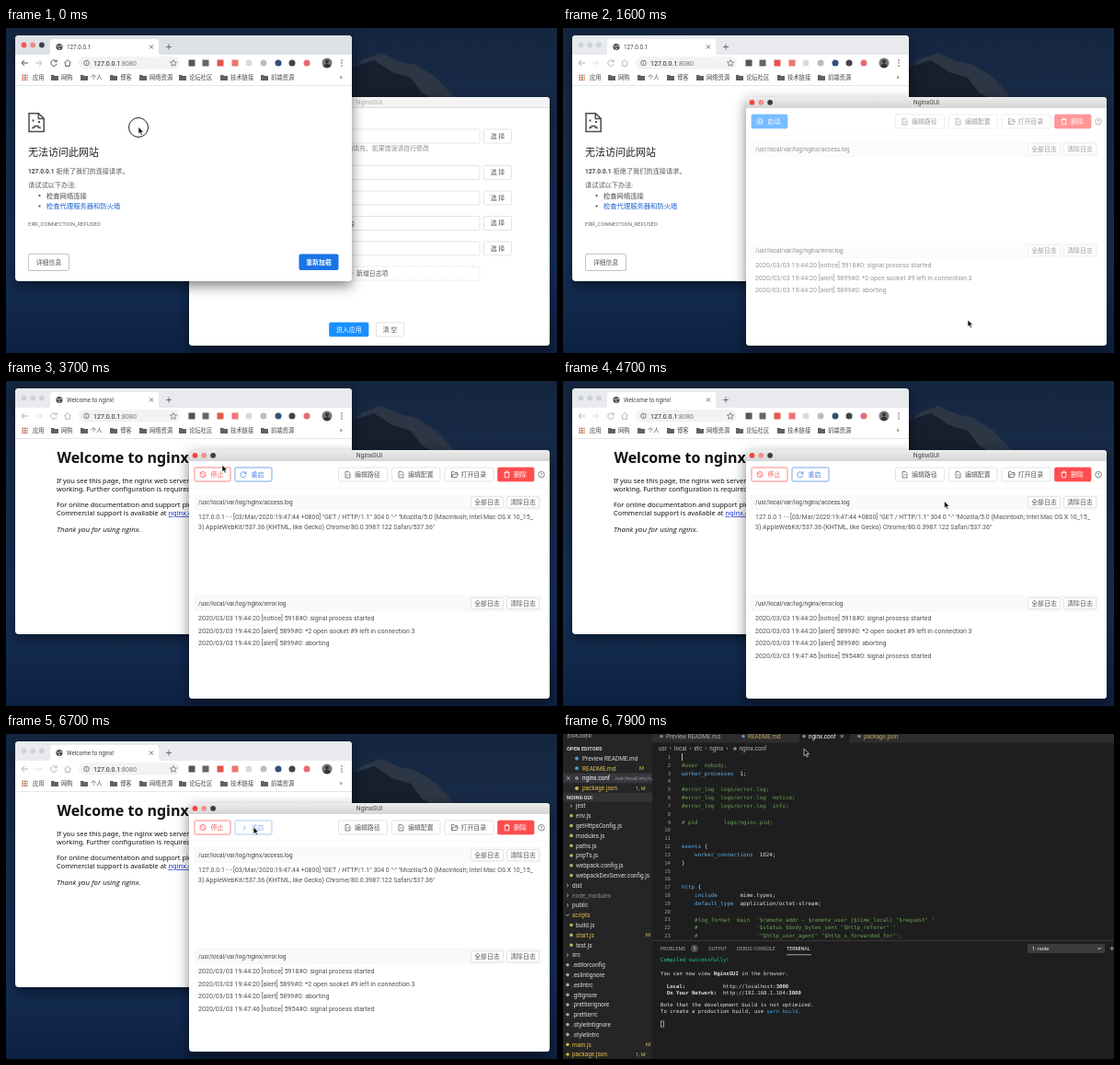
Animation, 599 px wide and 353 px high, one loop 8 s. Source, as an HTML page:

```html
<!DOCTYPE html>
<html lang="zh">
<head>
<meta charset="utf-8">
<title>NginxGUI</title>
<style>
html, body { margin: 0; width: 100%; height: 100%; overflow: hidden; background: #10213c; }
svg { display: block; width: 599px; height: 353px; font-family: Roboto, "Noto Sans CJK SC", "Noto Sans CJK", sans-serif; }
text { white-space: pre; }
.mono { font-family: "DejaVu Sans Mono", monospace; }
.page { font-family: "Noto Sans", sans-serif; }
.slanted { font-family: "Open Sans", sans-serif; font-style: italic; font-weight: 400; }
.shadow { filter: drop-shadow(0 5px 7px rgba(0, 0, 0, .5)); }
</style>
</head>
<body>
<svg id="stage" viewBox="0 0 599 353"></svg>
<script>
const rect = (x, y, w, h, fill, more = '') => `<rect x="${x}" y="${y}" width="${w}" height="${h}" fill="${fill}" ${more}/>`;
const disc = (x, y, r, fill, more = '') => `<circle cx="${x}" cy="${y}" r="${r}" fill="${fill}" ${more}/>`;
const line = (d, color = '#5f6368', width = 1, more = '') => `<path d="${d}" fill="none" stroke="${color}" stroke-width="${width}" ${more}/>`;
const group = (id, body, more = '') => `<g id="${id}" ${more}>${body}</g>`;
// Text is placed by its vertical middle.
const text = (x, mid, str, size = 6.9, fill = '#555', more = '') =>
  `<text x="${x}" y="${(mid + size * .36).toFixed(2)}" font-size="${size}" fill="${fill}" ${more}>${str}</text>`;
const center = 'text-anchor="middle"', right = 'text-anchor="end"', bold = 'font-weight="700"', medium = 'font-weight="500"';
const box = (x, y, w, h, fill = '#fff', stroke = '#d9d9d9', more = '') =>
  rect(x + .5, y + .5, w - 1, h - 1, fill, `rx="1.5" stroke="${stroke}" stroke-width=".7" ${more}`);
const button = (x, y, w, h, label, color = '#555', fill = '#fff', stroke = '#d9d9d9') =>
  box(x, y, w, h, fill, stroke) + text(x + w / 2, y + h / 2, label, 6.9, color, center);
const lights = (x, y, gap, colors) => colors.map((c, i) => disc(x + i * gap, y, 2.9, c)).join('');

const wallpaper = () => `
  <defs>
    <linearGradient id="sky" x2="0" y2="1">
      <stop offset="0" stop-color="#14263f"/><stop offset=".2" stop-color="#172a47"/>
      <stop offset=".7" stop-color="#163157"/><stop offset="1" stop-color="#0d2142"/>
    </linearGradient>
    <linearGradient id="bar" x2="0" y2="1">
      <stop offset="0" stop-color="#ececec"/><stop offset="1" stop-color="#d6d6d6"/>
    </linearGradient>
    <clipPath id="genieClip"><path id="genieEdge"/></clipPath>
  </defs>
  ${rect(0, 0, 599, 353, 'url(#sky)')}
  <path d="M360 62L388 34 408 27 428 36 446 40 468 54 490 78H360Z" fill="#2c3644"/>
  <path d="M360 48L400 35 420 48 440 54 452 70 470 80H360Z" fill="#151f2e"/>`;

const globe = disc(58, 20.5, 3.6, '#4a4d51') + line('M55.5 19.5q2 2 3 0t2.5 1M57 23l2-1', '#fff', .8);
const folder = x => `<path d="M${x} 51h3l1 1h4v5h-8z" fill="#5f6368"/>`;

function browser() {
  const marks = [[202, '#555'], [217, '#6a6460'], [233, '#e2574c'], [249, '#e8796f'], [264, '#dadada'], [280, '#bdbdbd'], [296, '#33507c'], [311, '#444'], [327, '#e86a72']];
  const folders = [[49, '网购'], [81, '个人'], [113, '博客'], [145, '网络资源'], [188, '论坛社区'], [233, '技术链接'], [277, '前端资源']];
  let grid = '';
  for (let i = 0; i < 9; i++) grid += rect(17.5 + i % 3 * 2.4, 50.7 + Math.floor(i / 3) * 2.4, 1.6, 1.6, ['#ea4335', '#5f6368', '#e58b2b'][i % 3]);
  return rect(10, 8, 366, 267, '#fff', 'rx="4" class="shadow"')
    + '<path id="strip" d="M10 29V12q0-4 4-4h358q4 0 4 4v17z"/>'
    + group('browserOn', lights(19.5, 18.5, 9.7, ['#f4564f', '#e98a84', '#3d3f43']))
    + group('browserOff', lights(19.5, 18.5, 9.7, ['#cfd2d6', '#cfd2d6', '#cfd2d6']))
    + '<path d="M46 29q2 0 2-3V15q0-3 3-3h112q3 0 3 3v11q0 3 2 3z" fill="#fff"/>' + globe
    + text(66, 20.5, '127.0.0.1', 6.3, '#444', 'id="tabTitle"')
    + line('M156 18.5l4 4m0-4l-4 4M174 20.5h6m-3-3v6', '#5f6368', .9)
    + group('nav', line('M24 38h-7m3-3l-3 3 3 3', '#555') + line('M32 38h7m-3-3l3 3-3 3', '#bbb')
      + line('M54.6 36.2a3.2 3.2 0 1 0 .5 2.6M55.2 34.4v2.3h-2.4', '#555')
      + line('M63.5 38l3.5-3.5 3.5 3.5M64.7 37.5v3.8h4.6v-3.8', '#555'))
    + rect(79, 31, 110, 13.5, '#f1f3f4', 'rx="6.7"')
    + disc(87.5, 38, 2.8, 'none', 'stroke="#5f6368" stroke-width=".8"') + line('M87.5 37.5v2M87.5 36v.8', '#5f6368', .8)
    + text(95, 38, '127.0.0.1<tspan fill="#777">:8080</tspan>', 7.05, '#222')
    + line('M182 34.5l1 2.4 2.6.2-2 1.7.6 2.5-2.2-1.4-2.2 1.4.6-2.5-2-1.7 2.6-.2z', '#5f6368', .7)
    + marks.map(([x, c], i) => i < 4 ? rect(x - 3.5, 34.5, 7, 7, c) : disc(x, 38, 3.5, c)).join('')
    + disc(349, 38, 5.5, '#777') + disc(349, 36.5, 2, '#333') + '<path d="M345 41.5q4-6 8 0-4 3.5-8 0z" fill="#333"/>'
    + [35, 38, 41].map(y => disc(365, y, .8, '#555')).join('')
    + grid + text(29, 53.8, '应用', 6.3, '#444')
    + folders.map(([x, s]) => folder(x) + text(x + 11, 53.8, s, 6.3, '#444')).join('')
    + text(362.5, 53.5, '»', 7, '#555') + rect(10, 62, 366, .7, '#dadce0')
    + group('refused', refusedPage()) + group('welcome', welcomePage(), 'class="page"');
}

function refusedPage() {
  return line('M25 92.7h10.5l5.7 5.7v14H25zM35.3 93v5.6h5.6', '#4a4d51', 1.5)
    + rect(28.5, 99.5, 2, 2, '#4a4d51') + rect(35, 101, 2, 2, '#4a4d51')
    + line('M29 109.5v-1.5h2v-1.5h4v1.5h2v1.5', '#4a4d51', 1.3)
    + text(24, 135, '无法访问此网站', 11, '#202124', medium)
    + text(24, 155.5, '127.0.0.1', 6.6, '#444', bold) + text(54.5, 155.5, '拒绝了我们的连接请求。', 7.2, '#555')
    + text(24, 170, '请试试以下办法:', 7.2, '#555')
    + disc(36.5, 182, 1.1, '#444') + text(44, 182, '检查网络连接', 7.3, '#444')
    + disc(36.5, 193.5, 1.1, '#444') + text(44, 193.5, '检查代理服务器和防火墙', 7.3, '#1a5fd0')
    + text(24, 212.5, 'ERR_CONNECTION_REFUSED', 6, '#666')
    + button(24, 245, 45, 19, '详细信息', '#555', '#fff', '#aaa')
    + rect(318.5, 245.5, 43, 17.5, '#1a73e8', 'rx="2"') + text(340, 254.3, '重新加载', 6.9, '#fff', `${center} ${bold}`);
}

function welcomePage() {
  const p = (y, s) => text(55, y, s, 7.4, '#111');
  return text(55.5, 83.5, 'Welcome to nginx!', 16, '#111', bold)
    + p(108, 'If you see this page, the nginx web server')
    + p(117.5, 'working. Further configuration is required.')
    + p(134.5, 'For online documentation and support please')
    + p(143.5, 'Commercial support is available at <tspan fill="#1030d0" text-decoration="underline">nginx.com</tspan>')
    + text(55, 160.7, 'Thank you for using nginx.', 7.9, '#111', 'class="slanted"');
}

function gui() {
  return rect(199, 75, 392, 270, '#fff', 'rx="3.5" class="shadow"')
    + '<path id="titleBar" d="M199 86.5V79q0-4 4-4h384q4 0 4 4v7.5z"/>' + rect(199, 86, 392, .6, '#c9c9c9')
    + group('guiOn', lights(205.5, 80.8, 9.8, ['#f4443e', '#f0908a', '#3a3d42']))
    + group('guiOff', lights(205.5, 80.8, 9.8, ['#dcdcdc', '#dcdcdc', '#dcdcdc']))
    + text(395, 80.8, 'NginxGUI', 6.8, '#444', center + ' id="guiTitle"')
    + group('settings', settingsPage()) + group('logs', logsPage());
}

function settingsPage() {
  const rows = [[117.5, 'Nginx', 'bin/nginx'], [157, 'Conf', 'etc/nginx/nginx.conf'], [184.5, 'Pid', 'var/run/nginx.pid'],
    [212, 'Access Log', 'var/log/nginx/access.log'], [239.5, 'Error Log', 'var/log/nginx/error.log']];
  const actions = x => button(x, 319.5, 43.5, 16, '进入应用', '#fff', '#1890ff', '#1890ff') + button(x + 51, 319.5, 31, 16, '清 空');
  return rows.map(([y, label, path]) => text(267, y, label + ':', 6.4, '#333', right)
      + box(270.5, y - 8, 245, 16) + text(276, y, '/usr/local/' + path, 6.45, '#555')
      + button(519, y - 8, 31, 16, '选 择')).join('')
    + text(271, 130.5, '选择nginx后、其他项路径会被自动填充、如果错误请自行修改', 6.9, '#8c8c8c')
    + box(270.5, 258.5, 245, 16, '#fff', '#d9d9d9', 'stroke-dasharray="2 1.5"')
    + line('M371.5 266.5h5m-2.5-2.5v5', '#666', .8) + text(381, 266.5, '新增日志项', 6.9)
    + group('firstActions', actions(351)) + group('backActions', actions(331.5) + button(421, 319.5, 32, 16, '返 回'));
}

const fileIcon = (x, c) => line(`M${x} 98.5h3.3l1.7 1.7v4.8h-5zM${x + 1.3} 102h2.4`, c, .8);

function logsPage() {
  const tool = (x, w, label, color, fill = '#fff', stroke = '#d9d9d9') =>
    box(x, 93.5, w, 16, fill, stroke) + text(x + 18, 101.7, label, 6.9, color);
  const header = (y, name) => rect(205, y, 376, 15.5, '#fafafa', 'stroke="#f2f2f2" stroke-width=".6"')
    + text(209, y + 8, `/usr/local/var/log/nginx/${name}.log`, 6.45, '#444')
    + button(505, y + 1.5, 36, 13, '全部日志') + button(544, y + 1.5, 36, 13, '清除日志');
  const error = (y, s) => text(209, y, '2020/03/03 ' + s, 7.1, '#505050');
  const access = (y, s) => text(209, y, s, 6.97, '#505050');
  const red = '#ff4d4f', blue = '#3f7fe8';
  return group('startTool', tool(204.5, 40, '启动', '#fff', '#1890ff', '#1890ff')
      + disc(214, 101.5, 3, 'none', 'stroke="#fff" stroke-width=".8"') + '<path d="M213.2 100v3l2.3-1.5z" fill="#fff"/>')
    + group('runTools', tool(204.5, 40, '停止', red, '#fff', red)
      + disc(214, 101.5, 3, 'none', `stroke="${red}" stroke-width=".8"`) + line('M212 99.5l4 4', red, .8)
      + group('restart', tool(248.5, 41, '重启', blue, '#fff', blue)
        + group('restartIcon', line('M260.4 100.2a3 3 0 1 0 .4 2M261 98.3v2.2h-2.2', blue, .8))
        + group('spinner', line('M257 98.8a3 3 0 0 1 2 4.8', blue, .8))))
    + tool(361, 54, '编辑路径') + fileIcon(369, '#666')
    + tool(419, 53.5, '编辑配置') + fileIcon(427, '#666')
    + group('configFocus', tool(419, 53.5, '编辑配置', blue, '#fff', blue) + fileIcon(427, blue))
    + tool(476.5, 54, '打开目录') + line('M484.5 104.5v-6h2.5l1 1h2.5v1.5M484.5 104.5l1.5-3.3h5.5l-1.5 3.3z', '#666', .8)
    + tool(534, 40.5, '删除', '#fff', red, red) + line('M541.5 99.5h6M543.3 99.2v-1h2.4v1M542.3 99.8v5h4.4v-5', '#fff', .8)
    + disc(582, 101.7, 3.3, 'none', 'stroke="#555" stroke-width=".7"') + text(582, 101.8, '?', 5, '#555', center)
    + rect(199, 116.5, 392, .6, '#f0f0f0') + header(123.7, 'access') + header(233.7, 'error')
    + group('accessLines', access(147.5, '127.0.0.1 - - [03/Mar/2020:19:47:44 +0800] "GET / HTTP/1.1" 304 0 "-" "Mozilla/5.0 (Macintosh; Intel Mac OS X 10_15_')
      + access(158.2, '3) AppleWebKit/537.36 (KHTML, like Gecko) Chrome/80.0.3987.122 Safari/537.36"'))
    + error(257.5, '19:44:20 [notice] 5918#0: signal process started')
    + error(271.2, '19:44:20 [alert] 5899#0: *2 open socket #9 left in connection 3')
    + error(284.9, '19:44:20 [alert] 5899#0: aborting')
    + group('restartLine', error(298.6, '19:47:46 [notice] 5954#0: signal process started'));
}

function editor() {
  const blue = '#62aee8', green = '#6ba354', plain = '#e2e2e2', yellow = '#e2bd4c', dimYellow = '#bda460', grey = '#dadada';
  const mono = (x, y, s, size, color) => text(x, y, s, size, color, 'class="mono"');
  const source = {
    2: ['#user  nobody;', green], 3: ['worker_processes', blue, '  1;', plain],
    5: ['#error_log  logs/error.log;', green], 6: ['#error_log  logs/error.log  notice;', green],
    7: ['#error_log  logs/error.log  info;', green], 9: ['# pid        logs/nginx.pid;', green],
    12: ['events', blue, ' {', plain], 13: ['    worker_connections', blue, '  1024;', plain], 14: ['}', plain],
    17: ['http', blue, ' {', plain], 18: ['    include', blue, '       mime.types;', plain],
    19: ['    default_type', blue, '  application/octet-stream;', plain],
    21: ['    #log_format  main  \'$remote_addr - $remote_user [$time_local] "$request" \'', green],
    22: ['    #                  \'$status $body_bytes_sent "$http_referer" \'', green],
    23: ['    #                  \'"$http_user_agent" "$http_x_forwarded_for"\';', green]
  };
  let code = '';
  for (let n = 1; n <= 23; n++) {
    const y = 25 + (n - 1) * 8.82, parts = source[n] || [];
    let spans = '';
    for (let i = 0; i < parts.length; i += 2) spans += `<tspan fill="${parts[i + 1]}">${parts[i]}</tspan>`;
    code += text(117, y, n, 5.6, '#999', right + ' class="mono"') + mono(129, y, spans, 5.87, plain);
  }
  // A leading 1 marks nested files, ">" and "v" mark folders.
  const tree = '>jest,1env.js,1getHttpsConfig.js,1modules.js,1paths.js,1pnpTs.js,1webpack.config.js,1webpackDevServer.config.js,>dist,>node_modules,>public,vscripts,1build.js,1start.js,1test.js,>src,.editorconfig,.eslintignore,.eslintrc,.gitignore,.prettierignore,.prettierrc,.stylelintignore,.stylelintrc,main.js,package.json'.split(',');
  const files = tree.map((entry, i) => {
    const y = 78 + i * 10.8, kind = entry[0], name = entry.replace(/^[>v1]/, '');
    const nested = kind === '1' || i === 0, dir = kind === '>' || kind === 'v';
    const color = /scripts|start|main|package/.test(name) ? yellow : name === 'node_modules' ? '#8a8a8a' : grey;
    const x = nested ? 14 : 10;
    const mark = dir ? line(kind === '>' ? `M${x - 6} ${y - 1.6}l1.8 1.6-1.8 1.6` : `M${x - 7} ${y - 1}l1.8 1.8 1.8-1.8`, grey, .7)
      : disc(x - 5, y, 1.8, i > 15 && i < 24 ? '#a4a9ae' : '#c9b84a');
    return mark + text(x, y, name, 6.45, color);
  }).join('');
  const opened = [['Preview README.md', grey], ['README.md', yellow], ['nginx.conf', '#fff'], ['package.json', yellow]]
    .map(([s, c], i) => disc(15, 26.5 + i * 10.8, 2, i === 2 ? '#8a8f94' : i === 3 ? '#c9b84a' : '#519aba') + text(21, 26.5 + i * 10.8, s, 6.45, c)).join('');
  const term = (y, s, color = plain) => mono(106, y, s, 5.65, color);
  const strong = s => `<tspan font-weight="700">${s}</tspan>`;
  const tab = (x, s, color = '#a8a8a8') => text(x, 233, s, 5.3, color);
  return rect(0, 0, 599, 353, '#1e1e1e') + rect(0, 0, 97, 353, '#252526') + rect(97, 0, 502, 9.5, '#2d2d2d') + rect(257, 0, 55, 9.5, '#1e1e1e')
    + text(5, 2, 'EXPLORER', 5.4, '#bbb') + text(4, 15.5, 'OPEN EDITORS', 5.6, grey, bold)
    + rect(0, 42.5, 97, 10.8, '#37373d') + line('M4 46.3l3.4 3.4m0-3.4l-3.4 3.4', grey, .7) + opened
    + text(56, 48.1, '/usr/local/etc/n…', 5.6, '#9a9a9a') + text(83, 37.3, 'M', 5.6, yellow) + text(79, 58.9, '1, M', 5.6, yellow)
    + rect(0, 63.8, 97, 10, '#343435') + text(4, 69, 'NGINX-GUI', 5.6, grey, bold) + files
    + text(90, 218.4, 'M', 5.6, yellow) + text(90, 337, 'M', 5.6, yellow) + text(79, 348, '1, M', 5.6, yellow)
    + [[112, 'Preview README.md', '#a8a8a8'], [201, 'README.md', dimYellow], [267, 'nginx.conf', '#fff'], [327, 'package.json', dimYellow]]
      .map(([x, s, c]) => disc(x - 5, 2.5, 1.8, '#6d8fa0') + text(x, 2.5, s, 6.3, c)).join('')
    + line('M301.5 .7l3.4 3.4m0-3.4l-3.4 3.4', grey, .7)
    + text(104, 16, 'usr  ›  local  ›  etc  ›  nginx  ›', 6.3, '#b4b4b4') + disc(187, 16, 1.8, '#8a8f94') + text(191.5, 16, 'nginx.conf', 6.4, '#b4b4b4')
    + code + rect(129, 21, .8, 8, '#ddd')
    + rect(97, 223.5, 502, 129.5, '#1e1e1e') + rect(97, 224, 502, .7, '#444')
    + tab(106, 'PROBLEMS') + disc(143, 233, 4, '#4d4d4d') + text(143, 233, '1', 5, '#fff', center)
    + tab(158, 'OUTPUT') + tab(189, 'DEBUG CONSOLE') + tab(243, 'TERMINAL', '#fff') + rect(243, 239.5, 27, .7, '#ddd')
    + rect(505, 228, 84, 10, '#3c3c3c') + text(510, 233, '1: node', 5.6, '#eee') + line('M581 232l2 2 2-2', '#eee', .7) + line('M594.5 233h4.5m-2.2-2.2v4.4', '#ccc', .7)
    + term(245, 'Compiled successfully!', '#23d18b')
    + term(260, `You can now view ${strong('NginxGUI')} in the browser.`)
    + term(273.5, `  ${strong('Local:')}            http://localhost:${strong('3000')}`)
    + term(280.7, `  ${strong('On Your Network:')}  http://192.168.1.104:${strong('3000')}`)
    + term(294.3, 'Note that the development build is not optimized.')
    + term(301.3, 'To create a production build, use <tspan fill="#3b9fe0">yarn build</tspan>.')
    + rect(106.5, 312, 3, 6, 'none', 'stroke="#ccc" stroke-width=".7"');
}

// Squeezed rows of text seen while the window is still warped.
function streaks() {
  let d = '';
  for (let i = 0; i < 7; i++) d += `M${488 + i * 13} ${259 + i * 5}h${40 + i % 3 * 9}`;
  return rect(440, 250, 159, 103, '#2a2a2b') + line('M466 254Q500 296 599 336V254Z', '#1c1c1d', 3)
    + line(d, '#777', 1.2, 'stroke-dasharray="9 3 5 6" opacity=".7"');
}

const stage = document.getElementById('stage');
stage.innerHTML = wallpaper() + group('windows', group('browser', browser()) + group('gui', gui()))
  + group('code', rect(0, 0, 599, 353, '#1e1e1e') + streaks() + group('editor', editor()), 'clip-path="url(#genieClip)"')
  + group('cursor', disc(0, .5, 10.5, 'none', 'id="ring" stroke="#222" stroke-width="1"')
    + '<path d="M0 0v7.6l1.8-1.6 1.2 2.8 1.4-.6-1.2-2.7h2.4z" fill="#111" stroke="#fff" stroke-width=".6"/>');

const ui = Object.fromEntries([...stage.querySelectorAll('[id]')].map(el => [el.id, el]));
const show = (id, on) => { ui[id].style.display = on ? '' : 'none'; };
const clamp = v => Math.max(0, Math.min(1, v));
const within = (t, a, b) => t >= a && t < b;

const track = [[0, 144, 107.5], [400, 144, 107.5], [1200, 372, 325], [1400, 372, 325], [1600, 440, 317], [1700, 440, 317],
  [2200, 224, 101], [2350, 224, 101], [2900, 43.5, 32], [3050, 51, 38], [3250, 51, 38], [3850, 269, 101], [4100, 269, 101],
  [4700, 414.5, 130.5], [5050, 388, 101], [5250, 388, 101], [5800, 349.5, 284], [6100, 353, 326], [6250, 353, 326],
  [6650, 269, 101], [6800, 269, 101], [7150, 446, 101], [7300, 446, 101], [7500, 458.5, 130], [7700, 458.5, 130], [7900, 262, 16], [8000, 262, 16]];

function pointer(t) {
  const i = track.findIndex(k => k[0] > t), [t0, x0, y0] = track[i - 1], [t1, x1, y1] = track[i];
  const u = (t - t0) / (t1 - t0), e = u * u * (3 - 2 * u);
  return [x0 + (x1 - x0) * e, y0 + (y1 - y0) * e];
}

function genie(t) {
  const k = Math.pow(clamp((t - 7500) / 300), 1.16);
  const top = 353 * (1 - k), x = 490 * (1 - k * k), foot = 626 * (1 - k ** 3);
  const width = foot - x, height = 353 - top;
  ui.genieEdge.setAttribute('d', `M${x} ${top}C${x + width * .24} ${top + height * .5} ${x + width * .66} ${top + height * .6} ${foot} 353H640V${top}Z`);
  show('code', k > 0);
  ui.editor.setAttribute('opacity', clamp((k - .35) / .4));
}

function draw(t) {
  const browserFront = t < 1200 || within(t, 2800, 3700), active = t < 7500;
  const front = browserFront ? ui.browser : ui.gui;
  if (ui.windows.lastElementChild !== front) ui.windows.append(front);

  show('browserOn', browserFront);
  show('browserOff', !browserFront);
  ui.strip.setAttribute('fill', browserFront ? '#dee1e6' : '#e8eaed');
  ui.nav.setAttribute('opacity', browserFront ? 1 : .45);
  const loaded = t >= 3200;
  show('refused', !loaded);
  show('welcome', loaded);
  ui.tabTitle.textContent = loaded ? 'Welcome to nginx!' : '127.0.0.1';

  const guiFocus = !browserFront && active;
  show('guiOn', guiFocus);
  show('guiOff', !guiFocus);
  ui.titleBar.setAttribute('fill', guiFocus ? 'url(#bar)' : '#f4f4f4');
  ui.guiTitle.setAttribute('fill', guiFocus ? '#444' : '#aaa');

  const settings = t < 1500 || within(t, 5200, 6200);
  const entered = t < 1500 ? -1000 : t < 5200 ? 1500 : t < 6200 ? 5200 : 6200;
  show('settings', settings);
  show('logs', !settings);
  ui[settings ? 'settings' : 'logs'].setAttribute('opacity', clamp((t - entered + 110) / 360));
  show('firstActions', t < 1500);
  show('backActions', t >= 1500);

  const busy = within(t, 4000, 4300) || t >= 6700;
  show('startTool', t < 2300);
  show('runTools', t >= 2300);
  show('restartIcon', !busy);
  show('spinner', busy);
  ui.spinner.setAttribute('transform', `rotate(${(t - 7600) * .36} 257 101.8)`);
  ui.restart.setAttribute('opacity', busy ? .6 : 1);
  show('configFocus', t >= 7200);
  show('accessLines', loaded);
  show('restartLine', t >= 4100);

  genie(t);
  const [x, y] = pointer(t);
  ui.cursor.setAttribute('transform', `translate(${x} ${y})`);
  show('ring', t < 300);
}

const start = performance.now();
function tick(now) {
  draw(Math.floor(Math.max(0, now - start) % 8000 / 100) * 100);
  requestAnimationFrame(tick);
}
draw(0);
requestAnimationFrame(tick);
</script>
</body>
</html>
```
